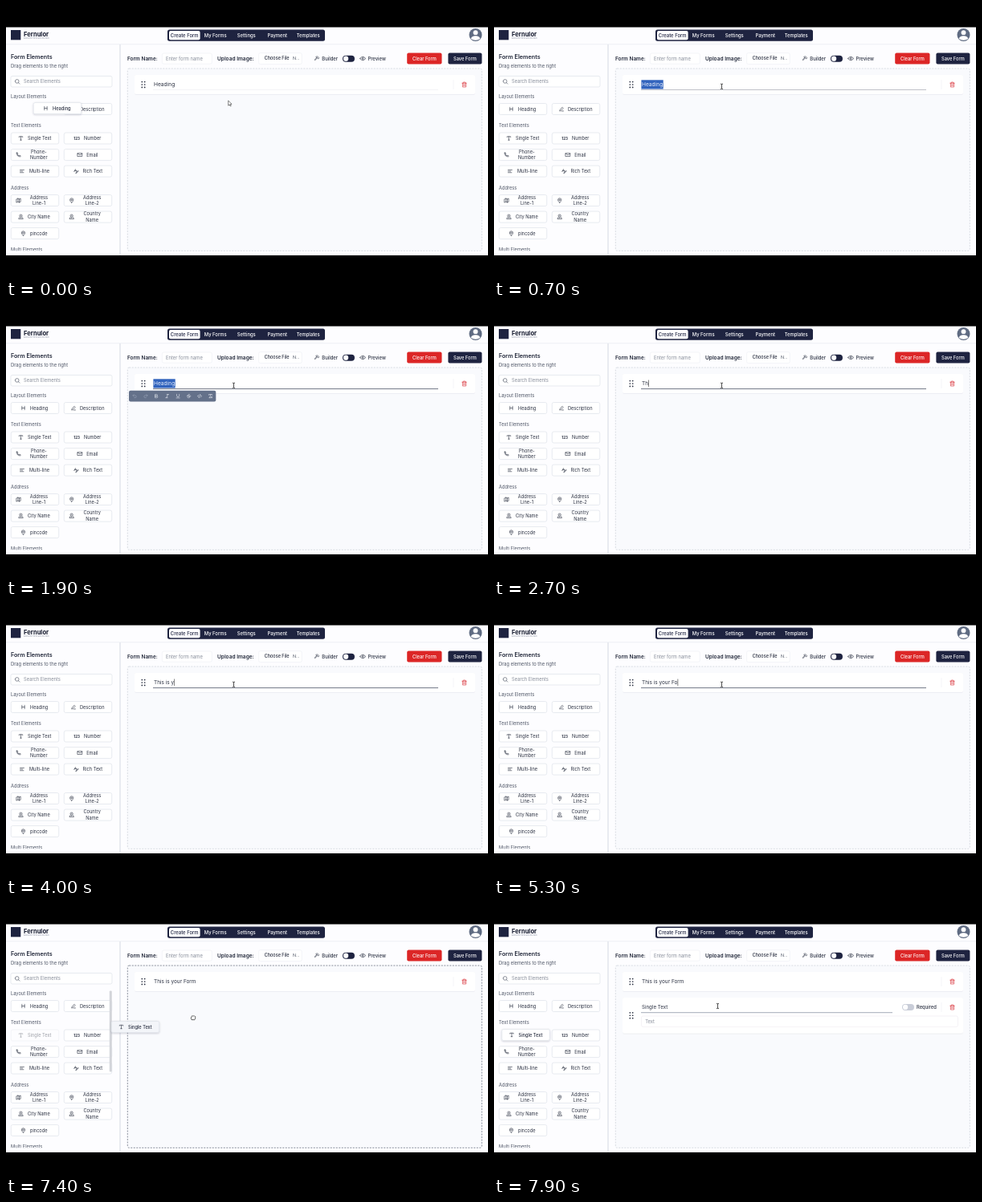
An HTML page that plays this animation: 600x338 px, repeating every 8 s.

```html
<!DOCTYPE html>
<html lang="en">
<head>
<meta charset="utf-8">
<title>Form builder</title>
<style>
html, body { margin: 0; width: 100%; height: 100%; overflow: hidden; background: #000; }
svg { display: block; width: 100%; height: 100%; }
text { font-family: Inter, "Noto Sans", sans-serif; white-space: pre; }
</style>
</head>
<body>
<svg id="stage" viewBox="0 0 600 338"></svg>
<script>
const LOOP = 8000;
const NAVY = '#1e2340', INK = '#2b3142', GRAY = '#4f5666', MUTED = '#868c99', EDGE = '#dfe3ea', RED = '#dc2626';
const stage = document.getElementById('stage');

function add(parent, tag, attrs = {}, content) {
  const el = document.createElementNS('http://www.w3.org/2000/svg', tag);
  for (const k in attrs) el.setAttribute(k, attrs[k]);
  if (content !== undefined) el.textContent = content;
  parent.appendChild(el);
  return el;
}
const group = (p, attrs) => add(p, 'g', attrs);
const box = (p, x, y, width, height, fill, attrs) => add(p, 'rect', { x, y, width, height, fill, ...attrs });
const line = (p, x1, y1, x2, y2, stroke, w = 0.6) => add(p, 'line', { x1, y1, x2, y2, stroke, 'stroke-width': w });
const dot = (p, cx, cy, r, fill, attrs) => add(p, 'circle', { cx, cy, r, fill, ...attrs });
const label = (p, str, x, y, size, fill, weight = 400, anchor = 'start') =>
  add(p, 'text', { x, y, fill, 'font-size': size, 'font-weight': weight, 'text-anchor': anchor }, str);

// Icons live on a 24-unit grid.
const ICONS = {
  h: 'M6 4V20M18 4V20M6 12H18',
  pen: 'M4 20L5 15L16 4L20 8L9 19ZM12 21H21',
  t: 'M4 7V4H20V7M12 4V20M9 20H15',
  phone: 'M4 3H8L10 8L7.500 10Q9.500 14.500 14 16.500L16 14L21 16V20Q21 21 19 21Q4 19 3 5Q3 3 4 3Z',
  mail: 'M2 5H22V19H2ZM2 7L12 13L22 7',
  lines: 'M3 6H21M3 12H15M3 18H19',
  rich: 'M2 14L8 3L14 14M4 10H12M10 21L12 16L20 9L22 11L14 19Z',
  map: 'M3 6L9 3L15 6L21 3V18L15 21L9 18L3 21ZM9 3V18M15 6V21',
  pin: 'M12 22Q4 14 4 10A8 8 0 0 1 20 10Q20 14 12 22ZM9 10A3 3 0 1 0 15 10A3 3 0 1 0 9 10',
  city: 'M12 15Q6 10 6 7A6 6 0 0 1 18 7Q18 10 12 15ZM12 6V8M7 14H5L2 21H22L19 14H17',
  search: 'M3 11A8 8 0 1 0 19 11A8 8 0 1 0 3 11M17 17L22 22',
  hammer: 'M13 11L4 20L2 18L11 9M9 5L14 3L21 10L18 14L14 10L12 10L9 7Z',
  eye: 'M1 12Q12 -2 23 12Q12 26 1 12ZM9 12A3 3 0 1 0 15 12A3 3 0 1 0 9 12',
  trash: 'M3 6H21M5 6V22H19V6M8 6V2H16V6M10 11V17M14 11V17',
  undo: 'M8 4L3 9L8 14M3 9H14A5.500 5.500 0 0 1 14 20H10',
  redo: 'M16 4L21 9L16 14M21 9H10A5.500 5.500 0 0 0 10 20H14',
  bold: 'M7 4H13A4 4 0 0 1 13 12H7ZM7 12H14A4 4 0 0 1 14 20H7Z',
  italic: 'M10 4H19M5 20H14M15 4L9 20',
  under: 'M6 3V10A6 6 0 0 0 18 10V3M4 21H20',
  strike: 'M17 5Q8 1 7 7Q7 11 13 12Q18 14 17 18Q14 22 6 19M3 12H21',
  code: 'M7 7L2 12L7 17M17 7L22 12L17 17M14 4L10 20',
  clear: 'M4 7V4H20V7M13 4L9 20M6 20H12M15 15L21 21M21 15L15 21'
};
const icon = (p, name, cx, cy, size = 6.6, stroke = INK, w = 2.2) => add(p, 'path', {
  d: ICONS[name], fill: 'none', stroke, 'stroke-width': w, 'stroke-linejoin': 'round', 'stroke-linecap': 'round',
  transform: `translate(${cx - size / 2} ${cy - size / 2}) scale(${size / 24})`
});

function pill(p, x, y, fill) {
  box(p, x, y, 15, 8, fill, { rx: 4 });
  dot(p, x + 4.1, y + 4, 3.1, '#fff');
}

function chip(p, x, cy, glyph, gx, str, tx, attrs = {}, weight = 400) {
  const g = group(p);
  g.face = box(g, x + .3, cy - 7, 59.4, 14, '#fff', { rx: 2, stroke: EDGE, 'stroke-width': .7, ...attrs });
  if (glyph === '123') label(g, glyph, gx, cy + 1.8, 4.5, INK, 700, 'middle');
  else icon(g, glyph, gx, cy);
  const [a, b] = str.split('|');
  if (b) {
    label(g, a, tx, cy - 1.7, 5.7, INK, 400, 'middle');
    label(g, b, tx, cy + 5.8, 5.7, INK, 400, 'middle');
  } else label(g, a, tx, cy + 2.1, 5.65, INK, weight);
  return g;
}

function card(p, y, h) {
  box(p, 160, y, 424, h, '#fff', { rx: 2, filter: 'url(#soft)' });
  for (const dx of [169.300, 172.700]) for (const dy of [-3.4, 0, 3.4]) dot(p, dx, y + h / 2 + dy, .85, INK);
  line(p, 557, y + 6, 557, y + 18, '#edeff3', .6);
  icon(p, 'trash', 570.5, y + 12, 7.2, '#d9363e');
}

// --- Page ---
const defs = add(stage, 'defs');
const shade = (id, dy, dev, alpha) => add(add(defs, 'filter', { id, x: '-10%', y: '-40%', width: '120%', height: '190%' }),
  'feDropShadow', { dx: 0, dy, stdDeviation: dev, 'flood-color': '#1e2340', 'flood-opacity': alpha });
shade('soft', .4, .7, .13);
shade('lift', .8, 1.2, .24);
box(add(defs, 'clipPath', { id: 'list' }), 0, 48, 142, 257.3, '#000');

box(stage, 0, 0, 600, 338, '#000');
box(stage, 0, 26.5, 600, 284.5, '#fdfdff');
line(stage, 0, 47.7, 600, 47.7, '#e9ebf1', .7);
line(stage, 142, 48, 142, 311, '#dcdfe7', 1.2);

box(stage, 6, 30, 12.3, 12.3, NAVY);
label(stage, 'Fernulor', 22, 37.8, 7.6, '#151a2e', 700);
label(stage, 'Build better forms with less work', 22, 41.3, 2.05, '#8b90a0');

box(stage, 201, 29.6, 196, 14.2, NAVY, { rx: 2.5 });
box(stage, 203, 31.1, 38.6, 11.2, '#fff', { rx: 1.8 });
['Create Form', 'My Forms', 'Settings', 'Payment', 'Templates'].forEach((s, i) =>
  label(stage, s, 222.2 + i * 38.5, 38.7, 5.9, i ? '#fff' : NAVY, 500, 'middle'));

dot(stage, 584.5, 36, 8, '#5f6b82');
dot(stage, 584.5, 33.2, 2.9, '#fff');
add(stage, 'path', { d: 'M578.8 41Q579.500 37.300 584.500 37.300Q589.500 37.300 590.200 41Q584.500 44.600 578.800 41Z', fill: '#fff' });

label(stage, 'Form Name:', 151, 67.9, 6.45, '#22283a', 600);
box(stage, 194.3, 59, 62, 13.2, '#fff', { rx: 2, stroke: '#eceef3', 'stroke-width': .6 });
label(stage, 'Enter form name', 199, 67.6, 5.85, MUTED);
label(stage, 'Upload Image:', 263, 67.9, 6.55, '#22283a', 600);
box(stage, 314.6, 58.6, 53.6, 14, '#fff', { rx: 2, stroke: '#eceef3', 'stroke-width': .6 });
label(stage, 'Choose File', 321.7, 67.1, 5.5, '#22283a', 500);
label(stage, 'N...', 357, 67.1, 5.3, GRAY);
icon(stage, 'hammer', 387, 65.4, 7);
label(stage, 'Builder', 393.3, 67.6, 5.9, INK, 500);
pill(stage, 419, 61.7, NAVY);
icon(stage, 'eye', 444.2, 65.5, 7.6);
label(stage, 'Preview', 450.4, 67.6, 5.9, INK, 500);
box(stage, 499.2, 58.6, 43.3, 14, RED, { rx: 2 });
label(stage, 'Clear Form', 520.9, 67.5, 5.7, '#fff', 500, 'middle');
box(stage, 550.4, 58.6, 42, 14, NAVY, { rx: 2 });
label(stage, 'Save Form', 571.4, 67.5, 5.7, '#fff', 500, 'middle');

// --- Sidebar ---
const side = group(stage, { 'clip-path': 'url(#list)' });
label(side, 'Form Elements', 6, 66.3, 7.2, '#22283a', 600);
label(side, 'Drag elements to the right', 6, 77.1, 5.8, GRAY);
box(side, 6, 87.4, 126, 13.6, '#fff', { rx: 2, stroke: EDGE, 'stroke-width': .7 });
icon(side, 'search', 14, 94.2, 7, GRAY);
label(side, 'Search Elements', 22, 96.2, 5.8, MUTED);
[['Layout Elements', 115], ['Text Elements', 151.1], ['Address', 228.6], ['Multi Elements', 306.2]]
  .forEach(([s, y]) => label(side, s, 6, y, 5.7, GRAY));

const heading = [6, 128.5, 'h', 21.5, 'Heading', 30];
const single = [6, 165, 't', 18.5, 'Single Text', 27];
const headingHome = chip(side, ...heading), singleHome = chip(side, ...single);
[[72, 128.5, 'pen', 84, 'Description', 92], [72, 165, '123', 88.2, 'Number', 97],
 [6, 185.6, 'phone', 15.5, 'Phone-|Number', 40.8], [72, 185.6, 'mail', 92, 'Email', 100.2],
 [6, 206.1, 'lines', 20, 'Multi-line', 29], [72, 206.1, 'rich', 87.5, 'Rich Text', 95.6],
 [6, 242.5, 'map', 15.7, 'Address|Line-1', 41], [72, 242.5, 'pin', 81.7, 'Address|Line-2', 107.2],
 [6, 263.1, 'city', 18.5, 'City Name', 27], [72, 263.1, 'city', 81.7, 'Country|Name', 107.2],
 [6, 283.6, 'pin', 21.5, 'pincode', 30]].forEach(c => chip(side, ...c));
const scrollbar = box(side, 128.8, 109.5, 3, 101, '#d3d5da', { rx: 1 });

// --- Canvas ---
const board = box(stage, 151.3, 78, 441, 227.3, '#f9fafd', { rx: 2, 'stroke-width': .8, 'stroke-dasharray': '2 1.5' });
card(stage, 86, 24);
const mark = box(stage, 183.4, 92.3, 27.3, 11.2, '#3163bd');
const title = label(stage, '', 184, 100.1, 6.45, INK);
const caret = box(stage, 0, 93.5, .6, 8.5, '#333');
const rule = line(stage, 183, 104.6, 538, 104.6, '#4d5566', .8);

const tools = group(stage);
box(tools, 153, 106.8, 108.3, 13.6, '#64718a', { rx: 2 });
['undo', 'redo', 'bold', 'italic', 'under', 'strike', 'code', 'clear'].forEach((n, i) =>
  icon(tools, n, 160.3 + i * 13.45, 113.6, 6.2, i < 2 ? '#9aa5b8' : '#eef1f6'));

const field = group(stage);
card(field, 118, 44.5);
label(field, 'Single Text', 184, 131.8, 6.2, INK);
const fieldRule = line(field, 183, 136.7, 496, 136.7, '#66748c', .7);
box(field, 183.5, 141, 394, 13.4, '#fff', { rx: 2, stroke: '#eeeaf0', 'stroke-width': .6 });
label(field, 'Text', 188.3, 149.6, 5.8, MUTED);
pill(field, 508, 125.9, '#c9cdd8');
label(field, 'Required', 526, 132, 5.8, INK, 500);

const lifted = { filter: 'url(#lift)' };
const headingDrag = chip(stage, ...heading, lifted, 500);
const singleDrag = chip(stage, ...single, lifted, 500);

// --- Pointers, each with its hot spot at 0,0 ---
const arrow = add(stage, 'path', { d: 'M0 0V6.200L1.500 4.900L2.500 7L3.500 6.500L2.500 4.500L4.400 4.400Z', fill: '#fff', stroke: '#333', 'stroke-width': .6 });
const beam = add(stage, 'path', { d: 'M-1.500 -3.200Q0 -3.200 0 -2.400Q0 -3.200 1.500 -3.200M0 -2.500V2.600M-1.500 3.200Q0 3.200 0 2.400Q0 3.200 1.500 3.200', fill: 'none', stroke: '#222', 'stroke-width': .8 });
const fist = add(stage, 'path', { d: 'M-2 2.600Q-3.200 .5 -2.500 -.5L-1.900 -.6V-1.700Q-1.300 -2.700 -.6 -2Q.1 -2.800 .7 -2Q1.500 -2.600 1.900 -1.700Q2.700 -1.800 2.700 -.7Q2.800 1.300 1.800 2.700Z', fill: '#fff', stroke: '#222', 'stroke-width': .7 });

// --- Motion ---
const PATH = [
  [0, 276.7, 118], [100, 278, 114], [400, 283.5, 100.3], [6000, 283.5, 100.3], [6200, 248, 99],
  [6400, 248, 99], [6500, 114.3, 117], [6600, 104, 126], [6800, 50, 163], [7000, 50, 163],
  [7100, 62, 162], [7200, 110, 160], [7300, 171, 153.5], [7400, 233, 143], [7500, 265, 134],
  [7600, 278.5, 128.5], [8000, 278.5, 128.5]
];
const KEYS = [2500, 2700, 2900, 3100, 3200, 3400, 3500, 3600, 4000, 4100, 4300, 4350, 4500, 4900, 5300, 5500, 5600];
const PHRASE = 'This is your Form';

const clamp = v => Math.max(0, Math.min(1, v));
const ramp = (t, a, b) => clamp((t - a) / (b - a));
const within = (t, a, b) => t >= a && t < b;
const show = (el, on) => el.setAttribute('display', on ? 'inline' : 'none');
const fade = (el, v) => { show(el, v > 0); el.setAttribute('opacity', v); };
const move = (el, x, y) => el.setAttribute('transform', `translate(${x} ${y})`);
const remaining = (t, start) => Math.pow(1 - ramp(t, start, start + 250), 2.6);

function pointer(t) {
  let i = 1;
  while (i < PATH.length - 1 && PATH[i][0] < t) i++;
  const [t0, x0, y0] = PATH[i - 1], [t1, x1, y1] = PATH[i], k = ramp(t, t0, t1);
  return [x0 + (x1 - x0) * k, y0 + (y1 - y0) * k];
}

function render(t) {
  const [x, y] = pointer(t);
  const dragging = within(t, 7000, 7700), returning = within(t, 7700, 7950);

  const grip = within(t, 6750, 7650), text = !grip && (within(t, 300, 6450) || t >= 7650);
  [[arrow, !grip && !text], [beam, text], [fist, grip]].forEach(([el, on]) => { show(el, on); move(el, x, y); });

  // Heading card: select, then type over.
  const typed = KEYS.filter(k => t >= k).length;
  const selected = within(t, 600, KEYS[0]);
  const str = typed ? PHRASE.slice(0, typed) : 'Heading';
  if (title.textContent !== str) title.textContent = str;
  title.setAttribute('fill', selected ? '#e9effb' : INK);
  title.setAttribute('font-size', typed ? 6.45 : 6.65);
  show(mark, selected);
  show(caret, within(t, KEYS[0], 6100));
  if (typed) caret.setAttribute('x', 184.3 + title.getComputedTextLength());
  fade(rule, (.08 + .42 * ramp(t, 300, 600) + .5 * ramp(t, 800, 1200)) * (1 - ramp(t, 6800, 7000)));
  fade(tools, ramp(t, 1450, 1650) * (1 - ramp(t, 2400, 2500)));

  // Heading chip settling back home.
  const rest = remaining(t, -119), settling = t < 131;
  show(headingDrag, settling);
  show(headingHome, !settling);
  move(headingDrag, 150 * rest, -5 * rest);

  // Single Text chip trails the pointer, then flies home.
  const [cx, cy] = pointer(Math.min(t, 7700) - 100);
  const back = returning ? remaining(t, 7700) : 1;
  show(singleDrag, dragging || returning);
  move(singleDrag, (cx - 46) * back, (cy - 164) * back);
  singleDrag.face.setAttribute('fill', dragging ? '#f3f5f9' : '#fff');
  fade(singleHome, returning ? 0 : dragging ? .45 : 1);

  show(scrollbar, within(t, 6600, 7650));
  board.setAttribute('stroke', within(t, 7200, 7700) ? '#6d7483' : '#cfd3db');
  show(field, t >= 7700);
  fade(fieldRule, .2 + .65 * ramp(t, 7700, 7900));
}

let start;
function tick(now) {
  start ??= now;
  render((now - start) % LOOP);
  requestAnimationFrame(tick);
}
render(0);
requestAnimationFrame(tick);
</script>
</body>
</html>
```
